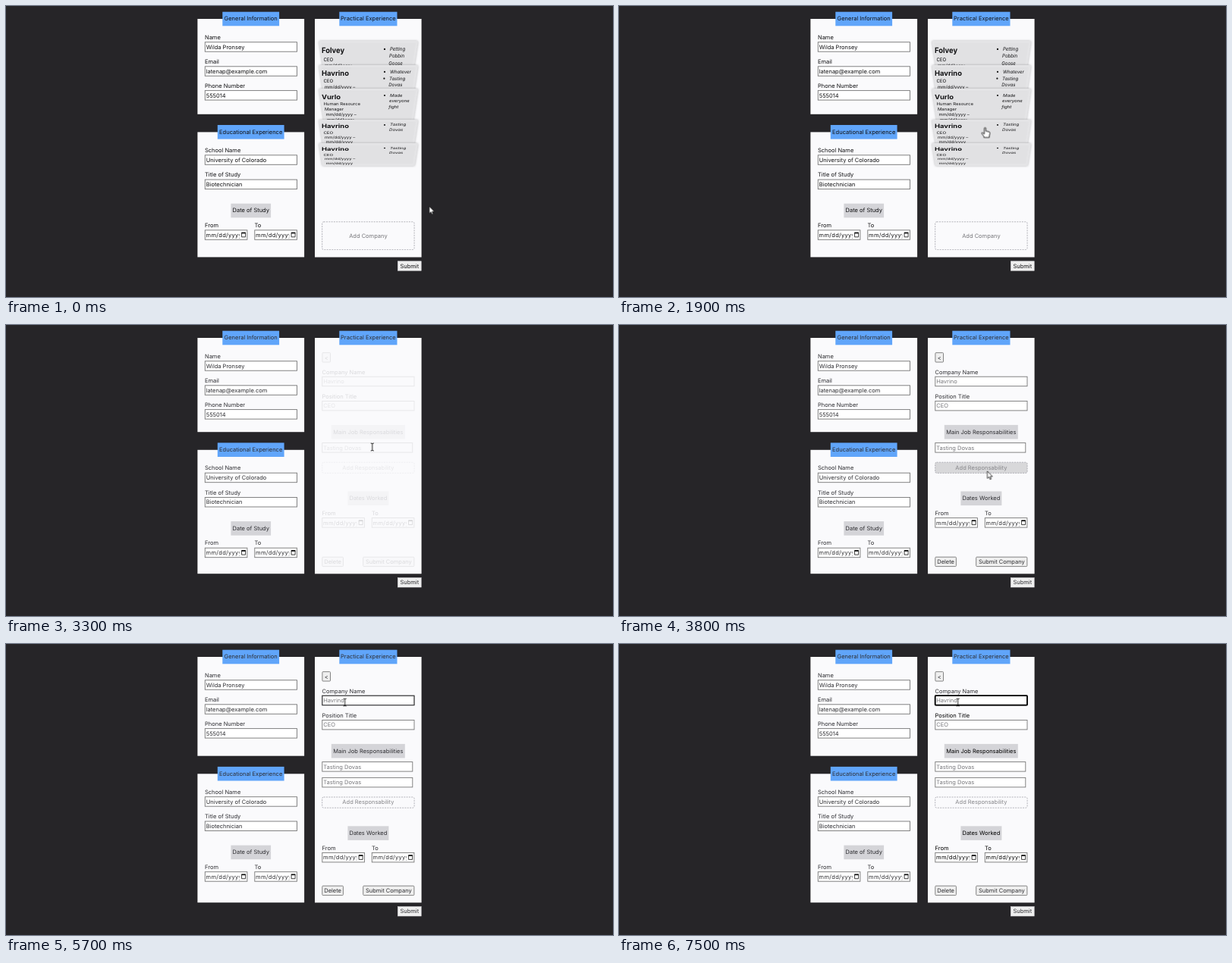
These frames come from a looping animation (800x384 px, 8 s). An HTML page:

```html
<!DOCTYPE html>
<html lang="en">
<head>
<meta charset="utf-8">
<title>Resume form</title>
<style>
@property --d { syntax: "<length>"; inherits: true; initial-value: 0px; }
@property --row { syntax: "<length>"; inherits: true; initial-value: 0px; }
html, body { margin: 0; width: 100%; height: 100%; overflow: hidden; background: #262528; }
svg { display: block; width: 800px; height: 384px; }
text { font-family: Inter, sans-serif; font-size: 7.5px; fill: var(--ink); text-rendering: geometricPrecision; white-space: pre; }

#stage, .late, .list, .form, .hover, .hot, .focus, .caret, .added, #add rect, #add text, .cur {
  animation: 8s step-end -15ms infinite;
}
#stage { animation-name: layout; }
.late { animation-name: darken; }
.panel { fill: #fafafc; }
.p1 { height: calc(125.8px + var(--d)); }
.p2 { height: calc(165px + var(--d)); }
.p3 { height: calc(314.5px + 2 * var(--d)); }
.s1 { transform: translateY(var(--d)); }
.s2 { transform: translateY(calc(2 * var(--d))); }
.rows { transform: translateY(var(--row)); }

.tag { fill: #60a5fa; }
.sub { fill: #d4d4d8; }
.box { fill: #fff; stroke: #767676; stroke-width: .9; }
.btn { fill: #efefef; stroke: #767676; stroke-width: .9; }
.plain { fill: #efefef; stroke: #dcdcdf; stroke-width: .6; }
.dash { fill: transparent; stroke: #a1a1aa; stroke-width: .8; stroke-dasharray: 2 1.3; }
.hint { fill: #77777b; }
.card { fill: #e4e4e6; fill-opacity: .93; stroke: #e4e4e6; stroke-width: 3; stroke-linejoin: round; filter: drop-shadow(0 .5px 1.6px #0004); }
.job { font-size: 9.4px; font-weight: 700; }
.role { font-size: 6px; }
.duty { font-size: 6.1px; font-style: italic; }

.list { animation-name: listOut; }
.form { animation-name: formIn; }
.added { animation-name: added; }
#add rect { animation-name: addFill; }
#add text { animation-name: addInk; }
.hover { fill: none; stroke: #38383b; stroke-width: 1; }
.h1 { animation-name: hoverDuty; }
.h2 { animation-name: hoverTitle; }
.h3 { animation-name: hoverName; }
.focus { fill: none; stroke: #000; stroke-width: 1.7; animation-name: focus; }
.caret { fill: #000; animation-name: caret; }
.arrow { animation-name: arrow; fill: #fff; stroke: #111; stroke-width: .8; }
.hand { animation-name: hand; fill: #fff; stroke: #111; stroke-width: .9; stroke-linejoin: round; }
.beam { animation-name: beam; fill: none; stroke: #000; stroke-width: .9; }

@keyframes layout {
  0% { --d: 0px; --row: 0px; --ink: #111113; }
  41.25% { --d: -1.6px; --row: 0px; --ink: #2e2e32; }
  60%, 100% { --d: 4.9px; --row: 20.8px; --ink: #2e2e32; }
}
@keyframes darken { 0% { --ink: #2e2e32; } 76.25%, 100% { --ink: #000; } }
@keyframes listOut { 0% { opacity: 1; } 41.25%, 100% { opacity: 0; } }
@keyframes formIn {
  0% { opacity: 0; } 41.25% { opacity: .15; } 42.5% { opacity: .45; }
  43.75% { opacity: .8; } 45%, 100% { opacity: 1; }
}
@keyframes added { 0% { opacity: 0; } 60% { opacity: .85; } 62.5%, 100% { opacity: 1; } }
@keyframes addFill { 0% { fill: #d4d4d800; } 47.5% { fill: #d8d8da; } 60%, 100% { fill: #d4d4d800; } }
@keyframes addInk { 0% { fill: #858589; } 60% { fill: #a2a2a6; } 61.25% { fill: #919195; } 62.5%, 100% { fill: #858589; } }
@keyframes hoverDuty { 0% { opacity: 0; } 45% { opacity: 1; } 47.5%, 100% { opacity: 0; } }
@keyframes hoverTitle { 0% { opacity: 0; } 67.5% { opacity: 1; } 71.25%, 100% { opacity: 0; } }
@keyframes hoverName { 0% { opacity: 0; } 71.25%, 100% { opacity: 1; } }
@keyframes focus { 0% { opacity: 0; } 76.25% { opacity: .7; } 77.5%, 100% { opacity: 1; } }
@keyframes caret {
  0% { opacity: 0; } 76.25% { opacity: 1; } 82.5% { opacity: 0; }
  90% { opacity: 1; } 93.75%, 100% { opacity: 0; }
}
@keyframes arrow {
  0% { transform: translate(557.8px, 264.3px); }
  16.25% { transform: translate(-50px, 0); }
  47.5% { transform: translate(485.4px, 192.8px); }
  65% { transform: translate(478px, 172px); }
  66.25% { transform: translate(462px, 136px); }
  67.5%, 100% { transform: translate(-50px, 0); }
}
@keyframes hand {
  0% { transform: translate(-50px, 0); }
  16.25% { transform: translate(515px, 201.8px); }
  18.75% { transform: translate(505px, 181px); }
  20% { transform: translate(496px, 162px); }
  22.5% { transform: translate(488.5px, 160.5px); }
  23.75% { transform: translate(482.5px, 160.5px); }
  38.75%, 100% { transform: translate(-50px, 0); }
}
@keyframes beam {
  0% { transform: translate(-50px, 0); }
  38.75% { transform: translate(482.7px, 161px); }
  47.5% { transform: translate(-50px, 0); }
  67.5% { transform: translate(450px, 106px); }
  68.75%, 100% { transform: translate(446.6px, 77px); }
}
</style>
</head>
<body>
<svg id="stage" viewBox="0 0 800 384"></svg>
<script>
const rect = (cls, x, y, w, h, r = 0) =>
  `<rect class="${cls}" x="${x}" y="${y}" width="${w}" height="${h}" rx="${r}"/>`;
const group = (cls, ...parts) => `<g class="${cls}">${parts.join('')}</g>`;

// y is the middle of the capitals
const text = (str, x, y, cls = '', anchor = 'start') =>
  `<text class="${cls}" x="${x}" y="${y + 2.7}" text-anchor="${anchor}">${str}</text>`;

const titled = (cls, str, x, y, w) =>
  rect(cls, x, y, w, 18.6) + text(str, x + w / 2, y + 9, '', 'middle');

const button = (str, x, y, w, cls = 'btn') =>
  rect(cls, x + .4, y + .4, w - .8, 12.4, cls === 'btn' ? 1 : 0) +
  text(str, x + w / 2, y + 6.6, '', 'middle');

const input = (str, x, y, w = 121.2, cls = '') =>
  rect('box', x + .3, y + .4, w, 12.5) + text(str, x + 1.7, y + 6.7, cls);

const field = (label, str, x, y, cls) => text(label, x, y) + input(str, x, y + 6, 121.2, cls);

const date = (label, x, y) => {
  const top = y + 6;
  return text(label, x, y) + rect('box', x + .3, top + .4, 55.6, 12.5) +
    `<svg x="${x}" y="${top}" width="45.8" height="13">
      <text x="1.6" y="9.4" letter-spacing=".28">mm/dd/yyyy</text></svg>
    <path d="M${x + 48.6} ${top + 4.2}h5v5.2h-5z" fill="none" stroke="#111" stroke-width=".8"/>
    <path d="M${x + 48.3} ${top + 4}h5.6" stroke="#111" stroke-width="1.7"/>`;
};

const line = (str, x, y, sy, cls) =>
  `<text class="${cls}" transform="translate(${x} ${y}) scale(1 ${sy})" y="2.3">${str}</text>`;

// Tilted cards: the flatter the card, the smaller its line step
const card = ({ top, end, y, step, name, info, duties }) => {
  const sy = step / 8.8;
  const lean = (end - top) * .14;
  let out = `<path class="card" d="M414 ${top + 1.5}H541.5L${541.5 - lean} ${end - 1.5}H${414 + lean}Z"/>`;
  out += line(name, 416, y + 2.1 + sy, sy, 'job');
  info.forEach((s, i) => {
    out += line(s, 418.4 + i * 1.5, y + 2.3 + step * (1.18 + i * .88), sy, 'role');
  });
  duties.forEach(([bullet, s], i) => {
    const ly = y + i * step;
    if (bullet) out += `<ellipse cx="${499 - i * .6}" cy="${ly + .4}" rx="1.1" ry="${1.1 * sy}" fill="#111"/>`;
    out += line(s, 506 - i * .9, ly, sy, 'duty');
  });
  return out;
};

const day = 'mm/dd/yyyy';
const open = day + ' –';
const snack = [[1, 'Tasting'], [0, 'Dovas']];
const cards = [
  { top: 46, end: 82, y: 56.5, step: 9.5, name: 'Folvey', info: ['CEO', open],
    duties: [[1, 'Petting'], [0, 'Pobbin'], [0, 'Goose']] },
  { top: 78, end: 113, y: 86.5, step: 8.8, name: 'Havrino', info: ['CEO', open],
    duties: [[1, 'Whatever'], ...snack] },
  { top: 109, end: 153, y: 117.5, step: 7.9, name: 'Vurlo', info: ['Human Resource', 'Manager', open, day],
    duties: [[1, 'Made'], [0, 'everyone'], [0, 'fight']] },
  { top: 150, end: 183, y: 156.5, step: 7, name: 'Havrino', info: ['CEO', open, day], duties: snack },
  { top: 181, end: 211, y: 187, step: 6, name: 'Havrino', info: ['CEO', open, day], duties: snack },
];

const general = rect('panel p1', 252.4, 17, 140.7, 125.8) +
  titled('tag', 'General Information', 285.3, 7.7, 74.8) +
  field('Name', 'Wilda Pronsey', 262, 41.3) +
  field('Email', 'latenap@example.com', 262, 73.4) +
  field('Phone Number', '555014', 262, 105.2);

const education = group('s1',
  rect('panel p2', 252.4, 166.4, 140.7, 165),
  titled('tag', 'Educational Experience', 278.8, 157, 87.8),
  field('School Name', 'University of Colorado', 262, 190.4),
  field('Title of Study', 'Biotechnician', 262, 222.7),
  titled('sub', 'Date of Study', 296.4, 260.7, 52.7),
  date('From', 262, 289.4), date('To', 327.5, 289.4));

const list = group('list', ...cards.map(card),
  rect('dash', 416.7, 284.8, 121.4, 36.8, 2),
  text('Add Company', 477.4, 303, 'hint', 'middle'));

const form = group('form',
  button('&lt;', 416.5, 36.2, 11.4),
  text('Company Name', 416.5, 62),
  group('late',
    input('Havrino', 416.5, 67.8, 121.2, 'hint'),
    field('Position Title', 'CEO', 416.5, 94, 'hint'),
    rect('hover h2', 416.8, 100.4, 121.2, 12.5),
    rect('hover h3', 416.8, 68.2, 121.2, 12.5),
    titled('sub', 'Main Job Responsabilities', 428.8, 131.9, 97),
    input('Tasting Dovas', 416.5, 155.2, 119, 'hint'),
    rect('hover h1', 416.8, 155.6, 119, 12.5),
    group('added', input('Tasting Dovas', 416.5, 176, 119, 'hint')),
    group('rows',
      `<g id="add">${rect('dash', 416.7, 181.2, 121.4, 14.2, 2)}${text('Add Responsability', 477.4, 188, '', 'middle')}</g>`,
      titled('sub', 'Dates Worked', 450.4, 219.5, 54),
      date('From', 416.5, 248.2), date('To', 482, 248.2)),
    rect('focus', 416.6, 68.2, 121.4, 12.4, 1.2),
    rect('caret', 418.4, 70, .8, 9)),
  group('s2', button('Delete', 416.4, 309, 28.4), button('Submit Company', 470.3, 309, 68)));

const practical = rect('panel p3', 407, 17, 140.6, 314.5) +
  titled('tag', 'Practical Experience', 439.3, 7.7, 76.2) + list + form +
  group('s2', button('Submit', 516, 336.4, 31.6, 'plain'));

const cursors = `
  <path class="cur arrow" d="M0 0V9.6L2.2 7.6 3.7 11 5.2 10.3 3.8 7.1H6.8Z"/>
  <path class="cur hand" d="M-1 .8Q-1 0 0 0T1 .8V4.6L5 5.4Q6.6 5.8 6.4 7.5L5.6 11V13H-1.6V11.5L-4.4 7.8Q-4.8 6.4-3.4 6.6L-1 8.4Z"/>
  <path class="cur beam" d="M-2-5Q-.3-5 0-4Q.3-5 2-5M0-4V4M-2 5Q-.3 5 0 4Q.3 5 2 5"/>`;

document.getElementById('stage').innerHTML = general + education + practical + cursors;
</script>
</body>
</html>
```
